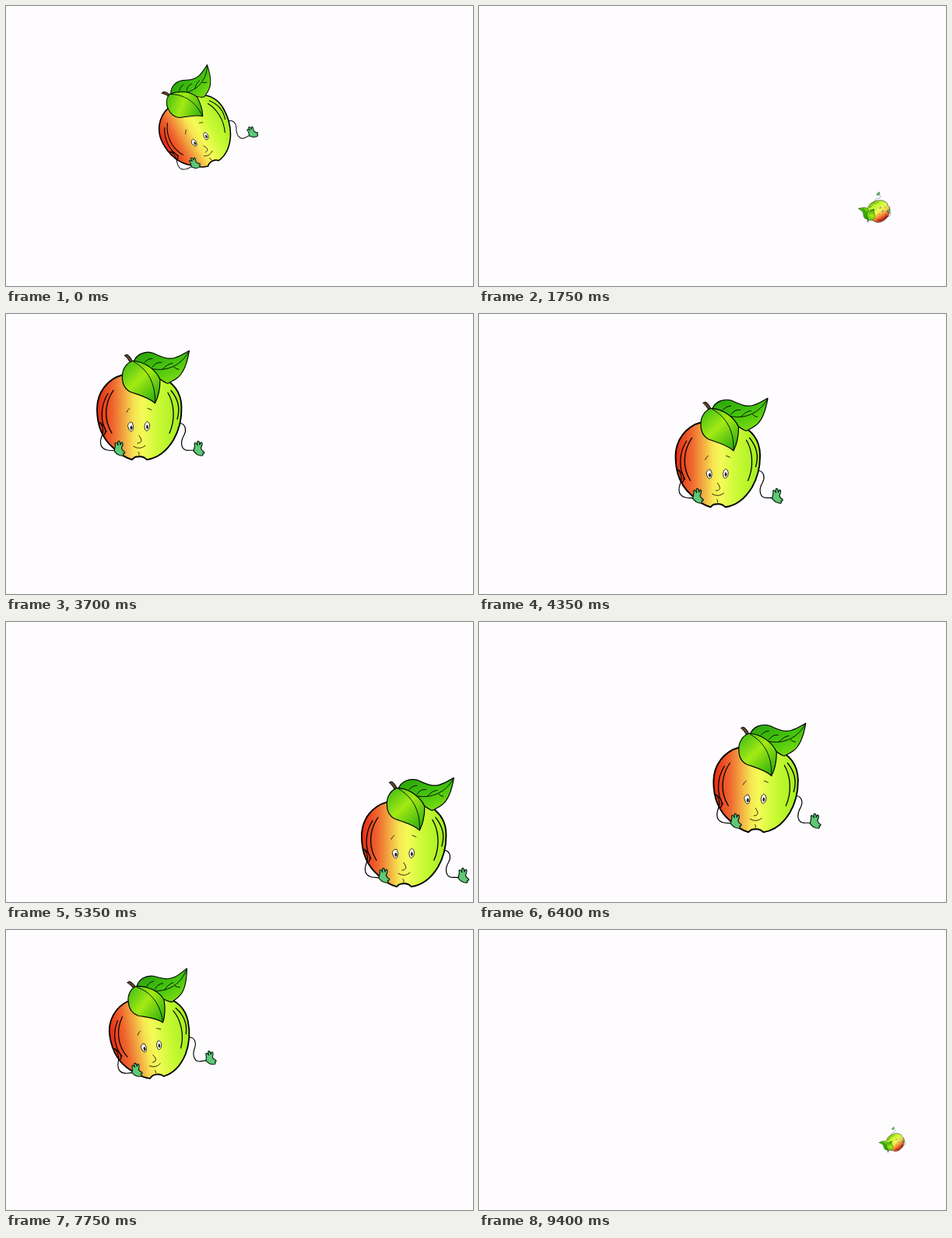
These frames come from a looping animation (600x360 px, 9450 ms). An HTML page:

```html
<!DOCTYPE html>
<html lang="en">
<head>
<meta charset="utf-8">
<title>Tumbling apple</title>
<style>
  html, body { margin: 0; width: 100%; height: 100%; overflow: hidden; background: #fefcff; }
  svg { display: block; width: 100%; height: 100%; }
  .line { fill: none; }
</style>
</head>
<body>
<svg viewBox="0 0 600 360">
  <defs>
    <linearGradient id="skin">
      <stop offset="0" stop-color="#e42a12"/>
      <stop offset=".2" stop-color="#ef6a30"/>
      <stop offset=".44" stop-color="#f6e552"/>
      <stop offset=".54" stop-color="#f4fb58"/>
      <stop offset=".72" stop-color="#cbfa35"/>
      <stop offset="1" stop-color="#a2ee1e"/>
    </linearGradient>
    <linearGradient id="frontLeaf" x1=".15" y1=".05" x2=".85" y2=".9">
      <stop offset="0" stop-color="#4cc214"/>
      <stop offset=".45" stop-color="#a4ea14"/>
      <stop offset="1" stop-color="#37b40e"/>
    </linearGradient>
    <linearGradient id="backLeaf" x1=".2" y1="0" x2=".8" y2="1">
      <stop offset="0" stop-color="#2ba40b"/>
      <stop offset=".5" stop-color="#45c40d"/>
      <stop offset="1" stop-color="#84e010"/>
    </linearGradient>
    <path id="hand" d="M0 13Q1 9 1.500 6Q.5 2 2.500 2.500Q4 3 5 5.500Q4 0 6 0Q8 1 8 5Q9 1.500 10.500 2Q12 4 9.500 9Q10 12 13.500 14Q14.500 16 11.500 16Q13 18 11 19Q7 19 4 17Z"
      fill="#5fc877" stroke="#062010"/>
  </defs>
  <g id="apple" stroke="#000" stroke-width="1.200" stroke-linecap="round" stroke-linejoin="round">
    <path class="line" d="M359 200C366 202 367 209 364 215C358 225 360 236 370 235H378"/>
    <path d="M285 138C266 143 252 160 252 182C252 204 260 221 273 232C281 240 290 245 297 247C300 243 303 243 307 243C311 243 313 244 316 247C330 245 342 235 350 222C357 210 361 196 360.500 179C360 160 349 147 332 140C315 145 300 144 285 138Z"
      fill="url(#skin)" stroke-width="1.900"/>
    <g class="line" stroke-width="1.300">
      <path d="M273 158C262 174 260 195 271 213M266 162C256 178 256 198 264 211"/>
      <path d="M343 161C351 174 353 195 345 213M347 158C357 170 359 182 355 195"/>
      <path d="M255 199C262 203 265 211 261 215" fill="#e23a18"/>
    </g>
    <path class="line" d="M256 199C261 207 260 212 258 217C254 228 257 237 276 235"/>
    <use href="#hand" x="274" y="223"/>
    <use href="#hand" x="376" y="223"/>
    <g class="line" stroke-width=".8">
      <path d="M290 186Q291 183 294 181M317 181L322 183M306 216Q309 220 309 223Q308 226 304 226M299 230Q307 235 314 229M305 237Q307 238 306 241"/>
      <path d="M291.500 203Q293 198 297 199Q300 204 298 209Q296 212 293.500 209Z" fill="#fff"/>
      <path d="M313 204Q314 198 317 198Q321 201 319 207Q316 212 314 209Z" fill="#fff"/>
    </g>
    <g stroke="none" fill="#222">
      <ellipse cx="296" cy="206" rx="1.500" ry="2.700"/>
      <ellipse cx="316.500" cy="205" rx="1.400" ry="2.700"/>
    </g>
    <path d="M299 121C303 111 314 107 324 110C333 114 342 119 352 116C359 114 365 110 370.500 107C368 122 363 136 355 142C350 146 346 147 343 149C338 148 332 143 326 138Z" fill="url(#backLeaf)"/>
    <path class="line" stroke-width=".9" d="M303 121C324 138 356 134 370 108M313 122Q317 117 323 117M323 128Q328 121 335 122M336 131Q342 124 349 123M351 128Q354 131 357 131"/>
    <path d="M287.500 113Q290 110.500 292.500 113Q296 116 298 122L295.500 124Q292 117 287.500 113Z" fill="#5b4031" stroke-width=".9"/>
    <path d="M298 120C290 122 284.500 131 284.500 139C284 148 287 156 295 160C306 164 319 167 326.500 174.500C331 166 333 156 333 144C328 132 314 121 298 120Z" fill="url(#frontLeaf)"/>
    <path class="line" stroke-width=".9" d="M299 121C317 131 327 148 326.500 173"/>
  </g>
</svg>
<script>
  const LOOP = 9450, STEP = 50, RAMP = 0.17;
  const START = { x: 171, y: 110 }, TRAVEL = { x: 362, y: 163 };
  // Turning points: even ones lie top left, odd ones bottom right.
  const TURNS = [-532, 1475, 3482, 5500, 7465, 9475];
  const apple = document.getElementById('apple');

  // Constant acceleration, steady speed, constant braking.
  function glide(p) {
    if (p > 0.5) return 1 - glide(1 - p);
    const speed = 1 / (1 - RAMP);
    return p < RAMP ? speed * p * p / (2 * RAMP) : speed * (p - RAMP / 2);
  }

  function draw(time) {
    let leg = 0;
    while (time >= TURNS[leg + 1]) leg++;
    const p = (time - TURNS[leg]) / (TURNS[leg + 1] - TURNS[leg]);
    const e = glide(leg % 2 ? 1 - p : p);
    const spin = leg % 4 < 2 ? e : 0;
    const x = START.x + TRAVEL.x * e, y = START.y + TRAVEL.y * e;
    apple.setAttribute('transform',
      `translate(${x} ${y}) rotate(${-130 * spin}) scale(${1 - 0.8 * spin}) translate(-321 -176.500)`);
  }

  const origin = performance.now();
  function tick() {
    const elapsed = (performance.now() - origin) % LOOP;
    draw(Math.floor(elapsed / STEP) * STEP);
    requestAnimationFrame(tick);
  }
  tick();
</script>
</body>
</html>
```
